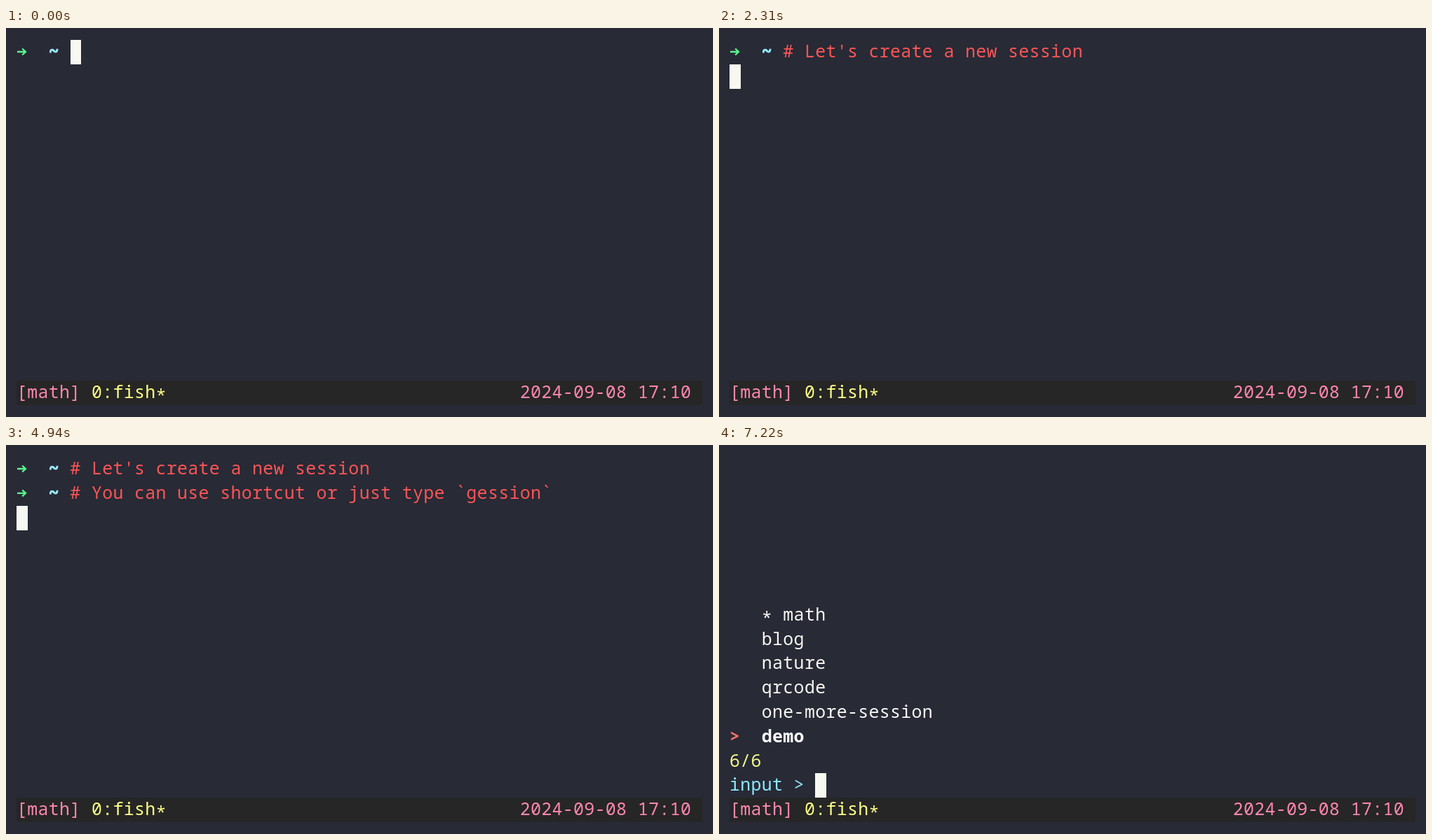
Recreate the animation shown at these times as an HTML page with a canvas. Size 1008x556 px, loop 8000 ms.

```html
<!DOCTYPE html>
<html lang="en">
<head>
<meta charset="utf-8">
<title>Terminal session</title>
<style>
  html, body { margin: 0; width: 100%; height: 100%; overflow: hidden; background: #282a36; }
  canvas { display: block; }
</style>
</head>
<body>
<canvas id="stage" width="1008" height="556"></canvas>
<script>
const ctx = document.getElementById('stage').getContext('2d');
const LOOP = 8000, LEFT = 15.3, TOP = 17, CELL = 15.27, ROW = 34.8;
const FONT = '24.8px "Noto Sans Mono", "DejaVu Sans Mono", monospace';
const COLOR = {
  back: '#282a36', bar: '#262626', text: '#f8f8f2', bold: '#ffffff',
  red: '#ff5555', brightRed: '#ff6e67', green: '#5af78e', tilde: '#9aedfe',
  cyan: '#8be9fd', yellow: '#f1fa8c', pink: '#ff87af', tab: '#ffff87'
};

// Screen updates while typing, in 10 ms ticks after the first key.
const comments = [
  { text: "# Let's create a new session", start: 500, enter: 2310,
    ticks: [0, 4, 8, 13, 17, 21, 26, 30, 35, 39, 44] },
  { text: '# You can use shortcut or just type `gession`', start: 2910, enter: 4940,
    ticks: [0, 5, 9, 14, 19, 23, 28, 32, 37, 41, 46, 50, 55, 59, 63, 68, 72] }
];
const command = 'gession';
const keyTimes = [5920, 6000, 6320, 6490, 6680, 6760, 6840];
const PROMPT_DELAY = 50, MENU_TIME = 7220;

const cellX = col => LEFT + col * CELL;
const rowY = row => TOP + row * ROW;

function write(text, col, row, color, weight = 'normal') {
  ctx.font = `${weight} ${FONT}`;
  ctx.fillStyle = color;
  [...text].forEach((char, i) => {
    const drop = char === '*' ? 5 : 0;
    ctx.fillText(char, cellX(col + i) - 0.3, rowY(row) + 25 + drop);
  });
}

function cursor(col, row) {
  const x = Math.round(cellX(col)), y = Math.round(rowY(row));
  ctx.fillStyle = COLOR.text;
  ctx.fillRect(x, y, Math.round(cellX(col + 1)) - x, 35);
}

function prompt(row) {
  const y = rowY(row) + 17;
  ctx.strokeStyle = COLOR.green;
  ctx.lineWidth = 2.3;
  ctx.beginPath();
  ctx.moveTo(16, y);
  ctx.lineTo(28, y);
  ctx.moveTo(23.2, y - 4.5);
  ctx.lineTo(28, y);
  ctx.lineTo(23.2, y + 4.5);
  ctx.stroke();
  write('~', 3, row, COLOR.tilde, 'bold');
  ctx.strokeStyle = COLOR.tilde;
  ctx.lineWidth = 1;
  ctx.strokeText('~', cellX(3) - 0.3, rowY(row) + 25);
}

function typedCount({ text, start, ticks }, t) {
  if (t < start) return 0;
  const elapsed = 10 * ticks.filter(tick => start + tick * 10 <= t).pop();
  return Math.min(text.length, 3 + Math.floor(elapsed / 17));
}

function drawShell(t) {
  for (const [row, line] of comments.entries()) {
    prompt(row);
    const count = typedCount(line, t);
    write(line.text.slice(0, count), 5, row, COLOR.red);
    if (t < line.enter) return cursor(5 + count, row);
    if (t < line.enter + PROMPT_DELAY) return cursor(0, row + 1);
  }
  const count = keyTimes.filter(time => time <= t).length;
  const done = count === command.length;
  prompt(2);
  write(command.slice(0, count), 5, 2, done ? COLOR.text : COLOR.brightRed);
  cursor(5 + count, 2);
}

function drawMenu() {
  ['* math', 'blog', 'nature', 'qrcode', 'one-more-session']
    .forEach((name, i) => write(name, 3, 6 + i, COLOR.text));
  write('>', 0, 11, COLOR.brightRed, 'bold');
  write('demo', 3, 11, COLOR.bold, 'bold');
  write('6/6', 0, 12, COLOR.yellow);
  write('input >', 0, 13, COLOR.cyan);
  cursor(8, 13);
}

function drawStatus() {
  ctx.fillStyle = COLOR.bar;
  ctx.fillRect(15, 504, 978, 35);
  write('[math]', 0, 14, COLOR.pink);
  write('0:fish*', 7, 14, COLOR.tab);
  write('2024-09-08 17:10', 47, 14, COLOR.pink);
}

const origin = performance.now();
function draw() {
  const t = (performance.now() - origin) % LOOP;
  ctx.fillStyle = COLOR.back;
  ctx.fillRect(0, 0, 1008, 556);
  drawStatus();
  if (t < MENU_TIME) drawShell(t);
  else drawMenu();
  requestAnimationFrame(draw);
}
draw();
</script>
</body>
</html>
```
